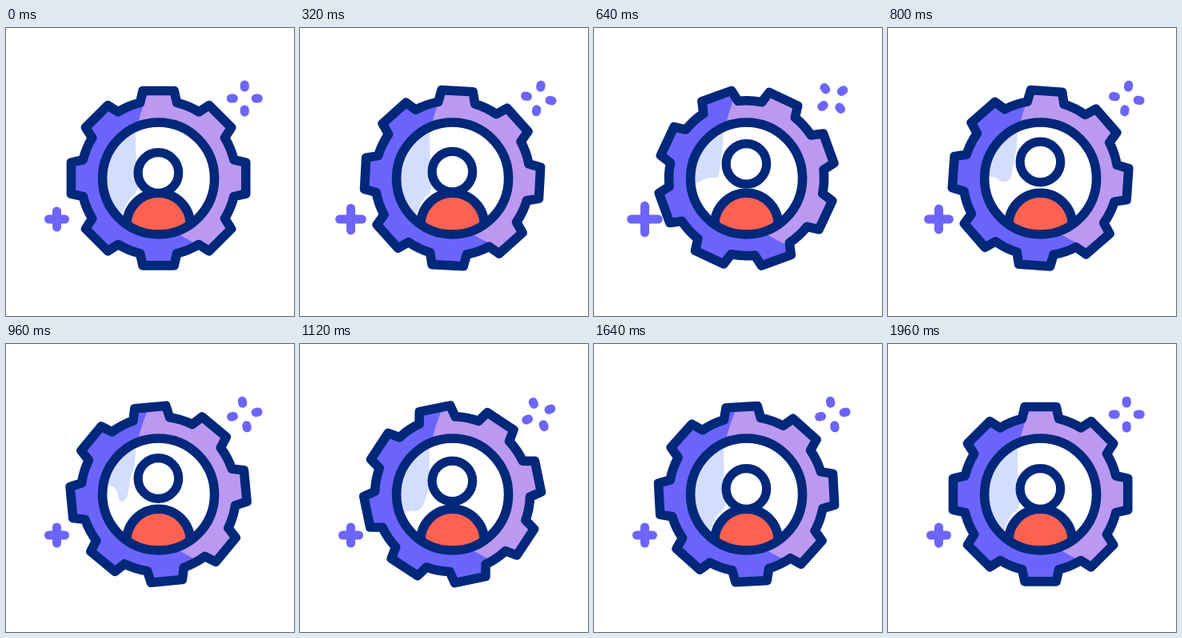
An HTML page for the animation above (2 s loop, 360 by 360 pixels).

```html
<!DOCTYPE html>
<html lang="en">
<head>
<meta charset="utf-8">
<title>Profile settings</title>
<style>
  html, body { margin: 0; width: 100%; height: 100%; overflow: hidden; background: #fff; }
  svg { display: block; width: 100vw; height: 100vh; }
  .line { fill: none; stroke: #00287a; stroke-width: 11.6; stroke-linejoin: round; stroke-linecap: round; }
  .spark { fill: none; stroke: #6c65fa; stroke-width: 11; stroke-linecap: round; }
</style>
</head>
<body>
<svg viewBox="0 0 360 360">
  <defs>
    <clipPath id="gearClip"><path class="gear"/></clipPath>
    <clipPath id="discClip"><circle cx="190.6" cy="188" r="70"/></clipPath>
  </defs>
  <path class="gear" fill="#6b64fb"/>
  <g clip-path="url(#gearClip)">
    <path fill="#bb99f1" d="M183 70Q170 97 165 120C158 185 172 237 216 258Q233 268 262 281L320 300V60Z"/>
  </g>
  <path class="gear line"/>
  <g clip-path="url(#discClip)">
    <circle cx="190.6" cy="188" r="70" fill="#fff"/>
    <path id="shade" fill="#d3ddfd"/>
    <path class="line" style="fill:#ff6151" d="M150.8 270V246A39.8 39.8 0 0 1 230.4 246V270Z"/>
  </g>
  <circle id="head" class="line" style="fill:#fff;stroke-width:11.2" cx="190.4" cy="181" r="25.3"/>
  <circle class="line" cx="190.6" cy="188" r="70"/>
  <path id="plus" class="spark"/>
  <path id="burst" class="spark" d="M298.3 74v-3M298.3 102v3M284.3 88h-3M312.3 88h3"/>
</svg>
<script>
const LOOP = 2000, STEP = 40, CX = 190.6, CY = 187.7;
const $ = id => document.getElementById(id);
const gears = document.querySelectorAll('.gear');

const polar = (r, deg) => {
  const a = deg * Math.PI / 180;
  return (CX + r * Math.sin(a)).toFixed(2) + ' ' + (CY - r * Math.cos(a)).toFixed(2);
};

function gearPath() {
  const root = 97, tip = 110.9;
  let d = '';
  for (let a = 0; a < 360; a += 45) {
    d += (a ? `A${root} ${root} 0 0 1 ` : 'M') + polar(root, a - 13.7);
    d += 'L' + polar(tip, a - 10.2) + 'L' + polar(tip, a + 10.2) + 'L' + polar(root, a + 13.7);
  }
  return d + `A${root} ${root} 0 0 1 ${polar(root, -13.7)}Z`;
}

const cubicInOut = x => x < 0.5 ? 4 * x ** 3 : 1 - 4 * (1 - x) ** 3;

// Symmetric cubic-bezier(h, 0, 1 - h, 1)
function bezier(x, h = 0.635) {
  let lo = 0, hi = 1;
  for (let i = 0; i < 30; i++) {
    const u = (lo + hi) / 2, v = 1 - u;
    if (3 * h * u * v * v + 3 * (1 - h) * u * u * v + u ** 3 < x) lo = u; else hi = u;
  }
  return lo * lo * (3 - 2 * lo);
}

const ramp = (t, a, b) => {
  const p = Math.min(1, Math.max(0, (t - a) / (b - a)));
  return p * p * (3 - 2 * p);
};

// Lower edge of the inner shade, right to left
const full = [162, 165, 166, 204, 156, 211, 149, 222, 144, 238, 110, 250];
const cut = [161, 150, 156, 184, 155, 187, 140, 187, 131, 193, 110, 204];
const drip = [162, 152, 155, 165, 152, 195, 141, 199, 138, 176, 110, 177];
const poses = [[0, full], [360, full], [640, cut], [960, drip], [1280, full], [LOOP, full]];

function shadePath(t) {
  const i = poses.findIndex(p => p[0] > t);
  const [t0, a] = poses[i - 1], [t1, b] = poses[i];
  const k = (t - t0) / (t1 - t0);
  const q = a.map((v, n) => v + (b[n] - v) * k);
  let d = 'M164 110L162 125';
  for (let n = 0; n < q.length - 2; n += 2) {
    d += `Q${q[n]} ${q[n + 1]} ${(q[n] + q[n + 2]) / 2} ${(q[n + 1] + q[n + 3]) / 2}`;
  }
  return d + `L${q[10]} ${q[11]}V110Z`;
}

function draw(t) {
  const p = Math.min(1, t / (LOOP - STEP));
  gears.forEach(g => g.setAttribute('transform', `rotate(${180 * cubicInOut(p)} ${CX} ${CY})`));
  $('burst').setAttribute('transform', `rotate(${360 * bezier(p)} 298.3 88)`);

  const lift = ramp(t, 200, 800) - ramp(t, 880, 1560);
  $('head').setAttribute('cy', 181 - 13.5 * lift);

  const arm = 10 + 7 * (ramp(t, 0, 600) - ramp(t, 600, 960));
  $('plus').setAttribute('d', `M${63.5 - arm} 239h${2 * arm}M63.5 ${239 - arm}v${2 * arm}`);

  $('shade').setAttribute('d', shadePath(t));
}

const outline = gearPath();
gears.forEach(g => g.setAttribute('d', outline));
const start = performance.now();
function tick() {
  const t = (performance.now() - start) % LOOP;
  draw(Math.floor(t / STEP) * STEP);
  requestAnimationFrame(tick);
}
tick();
</script>
</body>
</html>
```
